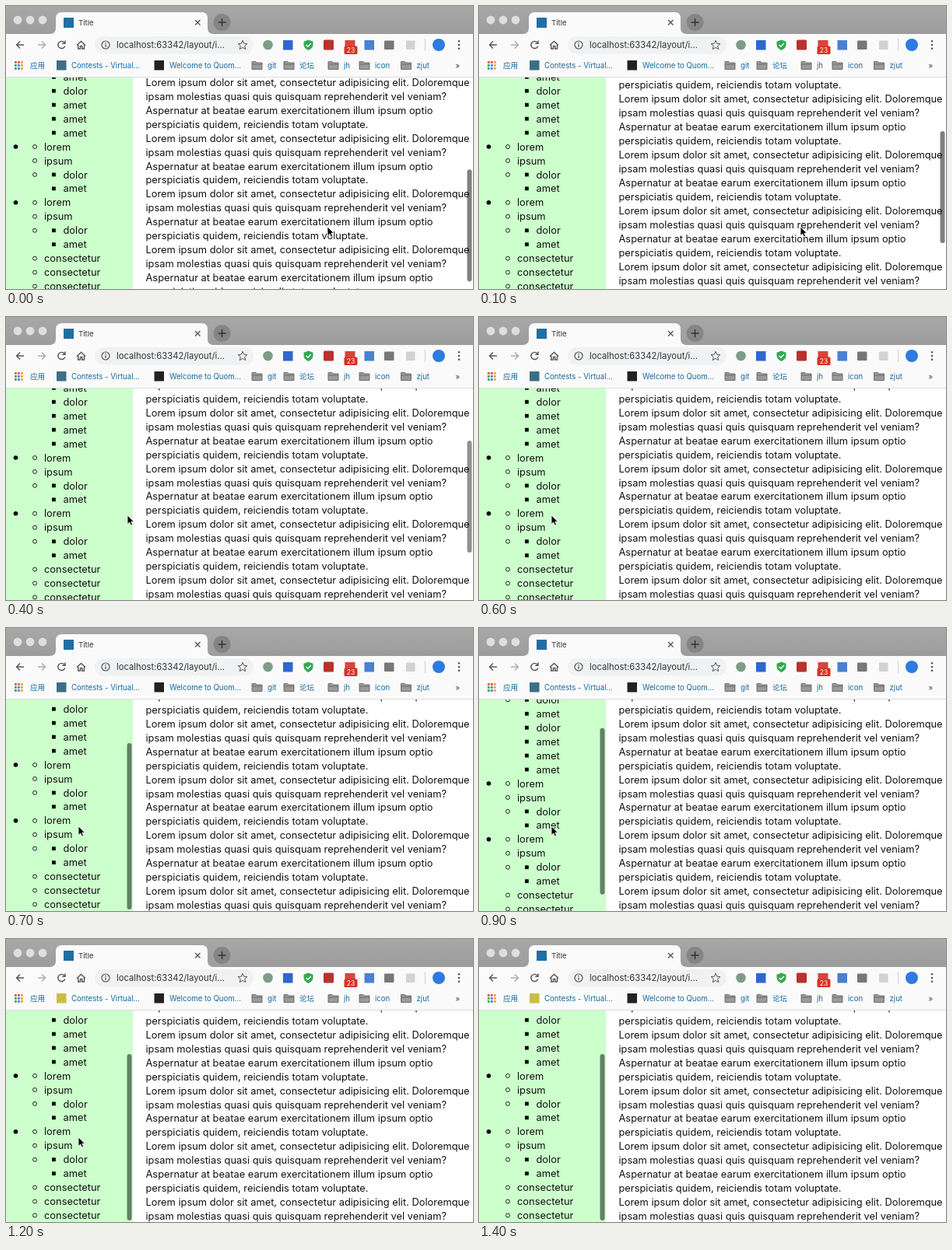
An HTML page that plays this animation: 600 by 364 pixels, repeating every 1.5 s.

```html
<!DOCTYPE html>
<html lang="zh-CN">
<head>
<meta charset="utf-8">
<title>Two scrolling columns</title>
<style>
  html, body { margin: 0; width: 100%; height: 100%; overflow: hidden; background: #fff; }
  svg { display: block; }
  text { font-family: Inter, "Noto Sans CJK SC", "Noto Sans CJK", sans-serif; white-space: pre; }
  .page text { font-size: 12.85px; fill: #111; }
  .marks text { font-size: 9.65px; fill: #1668a0; }
  .line { fill: none; stroke: #555; stroke-width: 1.4; }
</style>
</head>
<body>
<svg width="600" height="364" viewBox="0 0 600 364">
  <defs>
    <linearGradient id="bar" x2="0" y2="1">
      <stop stop-color="#a8a8a8"/><stop offset="1" stop-color="#9c9c9c"/>
    </linearGradient>
  </defs>

  <g class="page">
    <rect width="600" height="364" fill="#fff"/>
    <g id="article"></g>
    <rect y="91" width="163" height="273" fill="#cfc"/>
    <g id="list"></g>
    <rect id="listThumb" x="155.5" width="6" height="214" rx="3" opacity=".5"/>
    <rect id="pageThumb" x="592.5" width="6" height="144" rx="3"/>
  </g>

  <!-- title bar and tab -->
  <rect width="600" height="36" fill="url(#bar)"/>
  <g fill="#dedede">
    <circle cx="15" cy="18" r="5.4"/><circle cx="31" cy="18" r="5.4"/><circle cx="47" cy="18" r="5.4"/>
  </g>
  <path d="M56 36Q64 36 64 28V16Q64 8 72 8H251Q259 8 259 16V28Q259 36 267 36Z" fill="#fafafa"/>
  <rect x="74" y="15" width="13" height="13" fill="#1f6fa5"/>
  <text x="93" y="24.5" font-size="9.6" fill="#333">Title</text>
  <path class="line" d="M243 18l6.5 6.5m0-6.5l-6.5 6.5"/>
  <circle cx="277.500" cy="21" r="11" fill="#858585"/>
  <path d="M272.500 21h10m-5-5v10" stroke="#333" stroke-width="1.5"/>

  <!-- toolbar -->
  <rect y="36" width="600" height="55.500" fill="#fafafa"/>
  <rect y="91" width="600" height="1" fill="#dcdcdc"/>
  <path class="line" d="M23 50H13.500m4.500-4.500L13.500 50l4.500 4.500"/>
  <path class="line" d="M41 50h9.500m-4.500-4.500l4.500 4.500-4.500 4.500" style="stroke:#aaa"/>
  <path class="line" d="M75 47a4.600 4.600 0 1 0 .8 4.500M76 44.500v3.700h-3.700"/>
  <path class="line" d="M91 50.500l5.500-5 5.500 5M92.700 50v5h2.800v-3.500h2.200V55h2.800v-5"/>
  <rect x="114" y="39" width="204" height="22.500" rx="11.200" fill="#f0f1f2"/>
  <circle class="line" cx="128" cy="50" r="5" style="stroke-width:1.200"/>
  <path class="line" d="M128 49.500v3.300m0-5.800v1.300"/>
  <text x="142" y="54" font-size="11.25" fill="#333">localhost:63342/layout/i...</text>
  <path class="line" d="M304 44.300l1.700 3.900 4.200.4-3.200 2.800 1 4.200-3.700-2.200-3.700 2.200 1-4.200-3.200-2.800 4.200-.4z" style="stroke-width:1"/>

  <circle cx="336.500" cy="50" r="6.300" fill="#7d9c87"/>
  <rect x="356" y="44" width="12.500" height="12.500" fill="#2f66cf"/>
  <path d="M388.500 43.500l6 2.200v4q0 4.500-6 7.300-6-2.800-6-7.300v-4z" fill="#35a853"/>
  <path d="M385.500 50l2.300 2.300 4-4.300" fill="none" stroke="#fff" stroke-width="1.400"/>
  <rect x="408" y="43.500" width="13" height="13" rx="1.500" fill="#b8322c"/>
  <rect x="435.500" y="44" width="13" height="10" fill="#d8453a"/>
  <rect x="434.500" y="51.500" width="17" height="10.500" rx="1.500" fill="#d93025"/>
  <text x="443" y="60" font-size="8.5" fill="#fff" text-anchor="middle">23</text>
  <rect x="460.500" y="44" width="12.500" height="12.500" fill="#4b80d2"/>
  <rect x="486" y="44.500" width="12.500" height="11.500" rx="1" fill="#777"/>
  <rect x="514" y="44.500" width="11.500" height="11.500" rx="1" fill="#d2d2d2"/>
  <path d="M538.500 42v16" stroke="#d0d0d0"/>
  <circle cx="556" cy="50" r="8" fill="#2d7be0"/>
  <g fill="#555">
    <circle cx="582" cy="45.300" r="1.300"/><circle cx="582" cy="50" r="1.300"/><circle cx="582" cy="54.700" r="1.300"/>
  </g>

  <!-- bookmarks -->
  <g class="marks">
    <g id="apps"></g>
    <text x="31" y="79.500">应用</text>
    <rect id="contestIcon" x="65" y="70" width="12.500" height="12.500"/>
    <text x="84" y="79.500">Contests - Virtual...</text>
    <rect x="190.500" y="70" width="12.500" height="12.500" fill="#222"/>
    <text x="210" y="79.500">Welcome to Quom...</text>
    <g id="folders"></g>
    <text x="577.500" y="79.500" style="fill:#444">»</text>
  </g>

  <path id="cursor" d="M0 0V11.500L2.700 9 4.500 13 6.500 12.100 4.800 8.200H8.400Z" fill="#000" stroke="#fff" stroke-width=".8"/>
</svg>

<script>
const $ = id => document.getElementById(id);

function add(parent, tag, attrs, content = '') {
  const node = document.createElementNS('http://www.w3.org/2000/svg', tag);
  for (const key in attrs) node.setAttribute(key, attrs[key]);
  node.textContent = content;
  return $(parent).appendChild(node);
}

const LINE = 17.95;

const sentences = [
  'Lorem ipsum dolor sit amet, consectetur adipisicing elit. Doloremque',
  'ipsam molestias quasi quis quisquam reprehenderit vel veniam?',
  'Aspernatur at beatae earum exercitationem illum ipsum optio',
  'perspiciatis quidem, reiciendis totam voluptate.'
];
for (let i = -8; i < 16; i++) {
  add('article', 'text', { x: 179.5, y: 102.8 + i * LINE }, sentences[(i + 8) % 4]);
}

const items = ('lorem ipsum dolor amet dolor amet amet amet lorem ipsum dolor amet ' +
  'lorem ipsum dolor amet consectetur consectetur consectetur').split(' ');
items.forEach((item, i) => {
  const y = 181 + (i - 8) * LINE;
  const nested = item === 'dolor' || item === 'amet';
  add('list', 'text', { x: nested ? 73.5 : 49, y: y + 4.6 }, item);
  if (item === 'lorem') add('list', 'circle', { cx: 12.5, cy: y, r: 2.8 });
  if (nested) add('list', 'rect', { x: 59, y: y - 2.4, width: 4.8, height: 4.8 });
  if (!nested || items[i - 1] === 'ipsum') {
    add('list', 'circle', { cx: 37, cy: y, r: 2.5, fill: 'none', stroke: '#111', 'stroke-width': 0.9 });
  }
});

const appColors = ['#e2574c', '#e2574c', '#f0a33a', '#3fa45b', '#4285f4', '#f0a33a', '#3fa45b', '#4285f4', '#f0a33a'];
appColors.forEach((fill, i) => add('apps', 'rect', {
  x: 11 + i % 3 * 4, y: 71 + Math.floor(i / 3) * 4, width: 2.8, height: 2.8, fill
}));

for (const [x, name] of [[316, 'git'], [357, '论坛'], [414, 'jh'], [454, 'icon'], [507.5, 'zjut']]) {
  add('folders', 'path', {
    d: `M${x} 71.500h5l1.500 1.500h6.500v8.500h-13zm0 3.500h13`,
    fill: '#9a9a9a', stroke: '#686868', 'stroke-width': 0.9
  });
  add('folders', 'text', { x: x + 20, y: 79.5 }, name);
}

// Linear interpolation through [step, value] pairs
function track(keys, step) {
  const next = keys.findIndex(key => key[0] >= step);
  if (next < 0) return keys[keys.length - 1][1];
  if (next === 0) return keys[0][1];
  const [s0, v0] = keys[next - 1], [s1, v1] = keys[next];
  return v0 + (v1 - v0) * (step - s0) / (s1 - s0);
}

const cursorX = [[2, 413], [4, 156], [5, 112], [6, 93], [12, 93], [13, 374], [14, 560]];
const cursorY = [[2, 284], [4, 255], [12, 255], [13, 326], [14, 400]];
const articleShift = [[0, 0], [1, 93.2], [2, 96.8]];
const articleThumbAlpha = [[3, 0.5], [4, 0.43], [6, 0]];
const listShift = [[6, 0], [7, -5], [8, 3], [10, 35], [11, 42.5], [12, -5]];

function render(now) {
  // The screen updates ten times a second
  const step = Math.floor(now % 1500 / 100);
  const article = track(articleShift, step);
  const list = track(listShift, step);

  $('article').setAttribute('transform', `translate(0 ${article})`);
  $('pageThumb').setAttribute('y', 210.3 - article * 0.53);
  $('pageThumb').setAttribute('opacity', track(articleThumbAlpha, step));
  $('list').setAttribute('transform', `translate(0 ${list})`);
  $('listThumb').setAttribute('y', 148 - (list + 5) * 0.8);
  $('listThumb').setAttribute('visibility', step < 7 ? 'hidden' : 'visible');
  $('contestIcon').setAttribute('fill', step < 12 ? '#3c6f86' : '#c9bd45');
  $('cursor').setAttribute('transform', `translate(${track(cursorX, step)} ${track(cursorY, step)})`);
}

const start = performance.now();
function tick() {
  render(performance.now() - start);
  requestAnimationFrame(tick);
}
tick();
</script>
</body>
</html>
```
